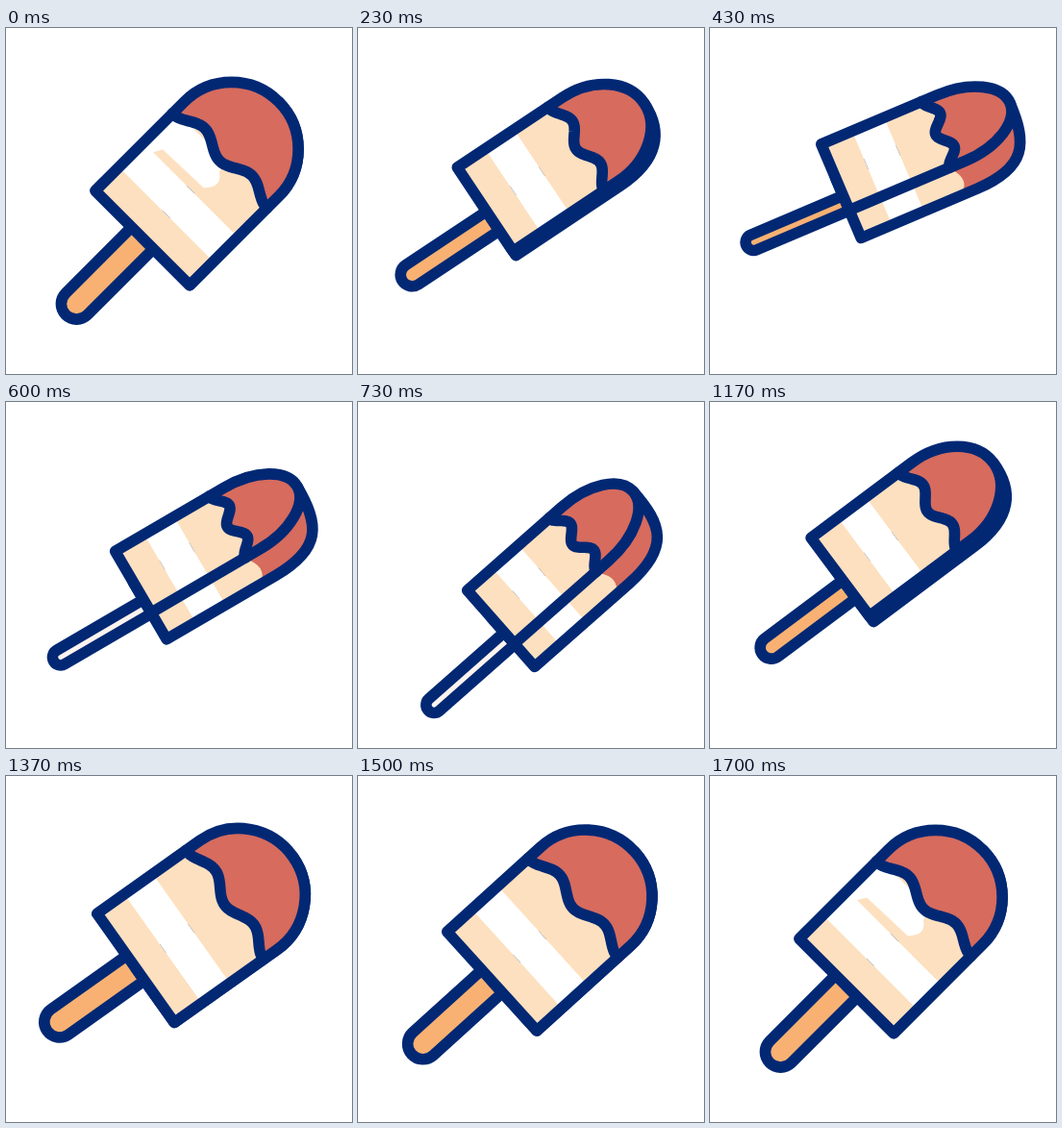
An HTML page with a canvas that plays this animation: 360 by 360 pixels, repeating every 2 s.

```html
<!DOCTYPE html>
<html>
<head>
<meta charset="utf-8">
<style>
  html, body { margin: 0; width: 100%; height: 100%; overflow: hidden; background: #fff; }
  canvas { display: block; }
</style>
</head>
<body>
<canvas id="stage" width="360" height="360"></canvas>
<script>
const ctx = document.getElementById('stage').getContext('2d');
const NAVY = '#022874', RED = '#d66b5e', CREAM = '#fde0bf', ORANGE = '#f8b172', PALE = '#fdf3ef', WHITE = '#fff';
const RADIUS = 69.5, SHOULDER = 131, REST = 1600;

// time, tilt in degrees, pivot x and y, turn (0 faces us, 1 shows the side)
const KEYS = [
  [0, 45, 212.7, 147.8, 0],
  [460, 22.8, 234, 143, 1],
  [730, 41.2, 232.7, 179.7, 1],
  [930, 53, 230.7, 180, 0.98],
  [980, 55, 231, 180, 0.94],
  [1170, 36.6, 225, 135, 0.55],
  [1290, 33.6, 218.6, 139.3, 0],
  [REST, 45, 212.7, 147.8, 0]
];

// Slope of channel c at key i; flat at turning points and at both ends
function slope(i, c) {
  const a = KEYS[i - 1], b = KEYS[i], d = KEYS[i + 1];
  if (!a || !d) return 0;
  const before = (b[c] - a[c]) / (b[0] - a[0]);
  const after = (d[c] - b[c]) / (d[0] - b[0]);
  return before * after > 0 ? 2 * before * after / (before + after) : 0;
}

function poseAt(t) {
  let i = 0;
  while (i < KEYS.length - 2 && t >= KEYS[i + 1][0]) i++;
  const a = KEYS[i], b = KEYS[i + 1], span = b[0] - a[0], p = Math.min(1, (t - a[0]) / span);
  const ease = p * p * (3 - 2 * p);
  return a.slice(1).map((v, n) => v + (b[n + 1] - v) * ease
    + span * p * (1 - p) * ((1 - p) * slope(i, n + 1) - p * slope(i + 1, n + 1)));
}

function fill(path, color) {
  ctx.fillStyle = color;
  ctx.fill(path);
}

function band(u0, u1, color) {
  ctx.fillStyle = color;
  ctx.fillRect(u0, -90, u1 - u0, 180);
}

function stripes() {
  band(-10, 35, CREAM);
  band(35, 71, WHITE);
  band(71, 210, CREAM);
}

// Paint inside a shape, then outline it
function panel(path, paint) {
  ctx.save();
  ctx.clip(path);
  paint();
  ctx.restore();
  ctx.stroke(path);
}

function drawStick(width, color) {
  const path = new Path2D();
  path.moveTo(0, width);
  path.arc(width - 113, 0, width, Math.PI / 2, Math.PI * 1.5);
  path.lineTo(0, -width);
  panel(path, () => band(-125, 5, color));
}

function drawSide(turn, mid, front, back, dome) {
  const top = SHOULDER + dome;
  const path = new Path2D();
  path.moveTo(top, mid);
  path.bezierCurveTo(top, mid + (back - mid) * (0.55 + 0.11 * turn),
    SHOULDER + dome * (0.55 + 0.3 * turn), back, SHOULDER, back);
  path.lineTo(0, back);
  path.lineTo(0, mid);
  path.closePath();
  const coat = new Path2D();
  coat.moveTo(210, mid);
  coat.lineTo(112, mid);
  coat.lineTo(112, front);
  coat.quadraticCurveTo(130, front + (back - front) * 0.6, 113, back);
  coat.lineTo(210, back);
  panel(path, () => {
    stripes();
    fill(coat, RED);
  });
}

// Bare patch above the middle stripe while the bar rests
function drawGap() {
  const gap = new Path2D('M70-72V-56L80-50 82 8Q96 22 105 8L118 4V-72Z');
  fill(gap, WHITE);
}

function drawFront(resting, mid, half, dome) {
  const path = new Path2D();
  path.moveTo(0, mid - half);
  path.ellipse(SHOULDER, mid, dome, half, 0, -Math.PI / 2, Math.PI / 2);
  path.lineTo(0, mid + half);
  path.closePath();
  const wave = new Path2D();
  for (let p = -1; p <= 1; p += 1 / 32)
    wave.lineTo(120 - 6.5 * Math.cos(p * 2 * Math.PI), mid + half * p);
  const coat = new Path2D(wave);
  coat.lineTo(210, mid + half);
  coat.lineTo(210, mid - half);
  panel(path, () => {
    stripes();
    if (resting) drawGap();
    fill(coat, RED);
  });
  ctx.stroke(wave);
}

function draw(t) {
  const [tilt, x, y, turn] = poseAt(t);
  const c = Math.cos(tilt * Math.PI / 180), s = Math.sin(tilt * Math.PI / 180);
  const narrowing = 1 - (1 - turn) ** 3;
  const left = 3 * narrowing - RADIUS;
  const front = RADIUS - 62 * turn;
  const back = Math.max(front, RADIUS - 30 * narrowing);
  const mid = (front + left) / 2, half = (front - left) / 2;
  const dome = RADIUS - 3 * turn;

  ctx.setTransform(1, 0, 0, 1, 0, 0);
  ctx.fillStyle = WHITE;
  ctx.fillRect(0, 0, 360, 360);
  // Local u runs from stick to tip, v across it
  ctx.setTransform(c, -s, s, c, x - 100 * c, y + 100 * s);
  ctx.strokeStyle = NAVY;
  ctx.lineWidth = 11.6;
  ctx.lineJoin = ctx.lineCap = 'round';
  drawStick(16 - 7.7 * turn, t > 500 && t < 1050 ? PALE : ORANGE);
  drawSide(turn, mid, front, back, dome);
  drawFront(t < 30 || t >= REST, mid, half, dome);
}

const start = performance.now();
function tick() {
  const t = (performance.now() - start) % 2000;
  draw(Math.floor(t * 0.03 + 0.11) / 0.03); // 30 steps a second
  requestAnimationFrame(tick);
}
tick();
</script>
</body>
</html>
```
